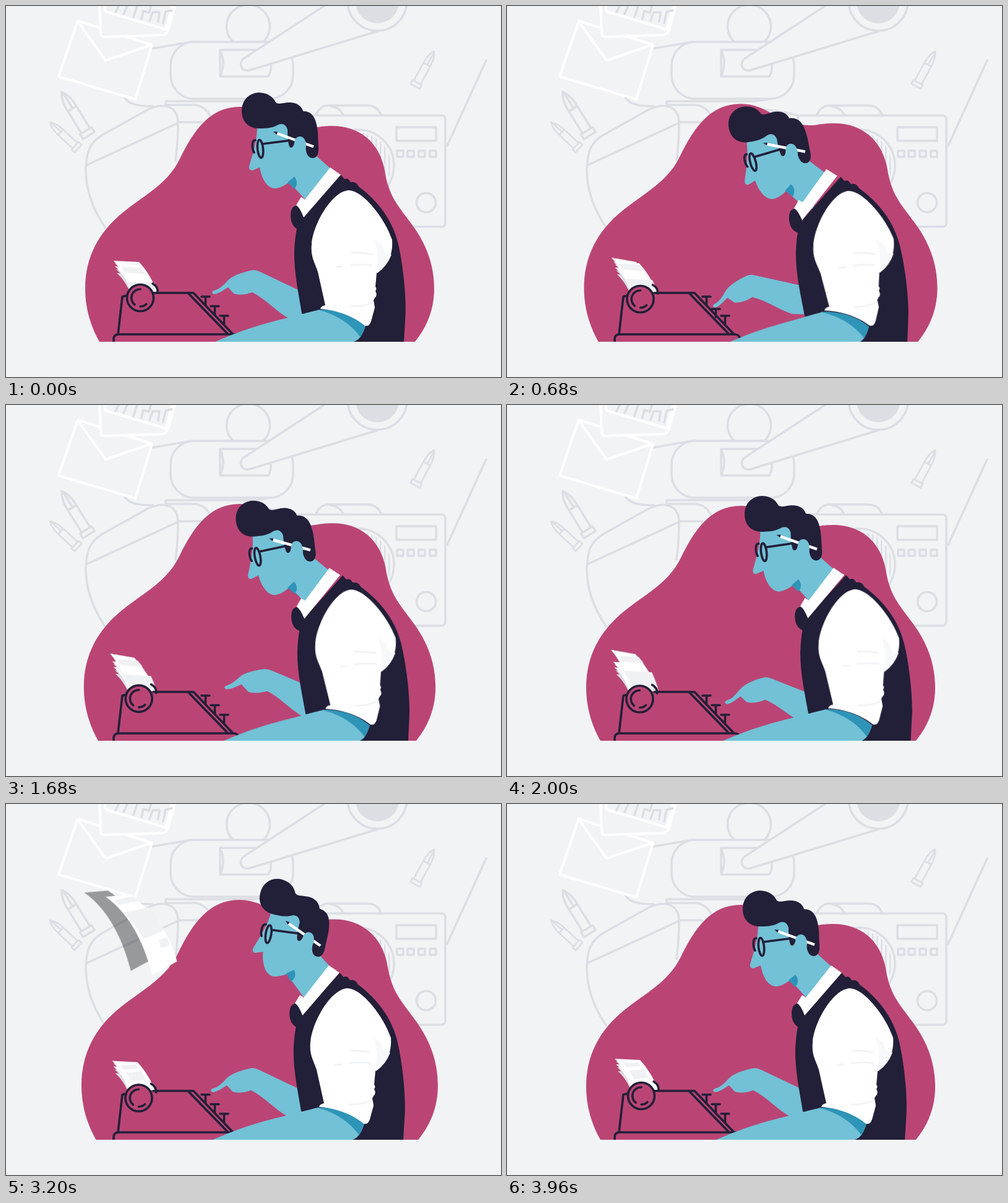
An HTML page that plays this animation: 800x600 px, repeating every 4 s.

```html
<!DOCTYPE html>
<html lang="en">
<head>
<meta charset="utf-8">
<style>
html, body { margin: 0; width: 100%; height: 100%; overflow: hidden; background: #f1f3f5; }
svg { display: block; width: 100%; height: 100%; }
.line { fill: none; stroke: #dcdee4; stroke-width: 3.5; stroke-linecap: round; stroke-linejoin: round; }
.bg { fill: #f1f3f5; }
.mail { fill: #f1f3f5; stroke: #fff; stroke-width: 4; stroke-linejoin: round; }
.ink { fill: none; stroke: #221f38; stroke-width: 3.6; stroke-linecap: round; stroke-linejoin: round; }
.navy { fill: #221f38; }
.skin { fill: #72c1d6; }
.shade { fill: #2e94b8; }
.white { fill: #fff; }
.pink { fill: #ba4574; }
.tint { fill: #eff1f3; }

.move { animation: 4s ease-in-out infinite; }
#blob { transform-origin: 410px 543px; animation: breathe 2s ease-in-out infinite; }
#head { transform-origin: 498px 228px; animation-name: head; }
#neck { transform-origin: 505px 285px; animation-name: neck; }
#vest { transform-origin: 478px 497px; animation-name: vest; }
#collar { transform-origin: 478px 497px; animation-name: collar; }
#sleeve { transform-origin: 555px 299px; animation-name: sleeve; }
#forearm { transform-origin: 475px 480px; animation-name: forearm; }
#leg { transform-origin: 581px 517px; animation-name: leg; }
#carriage, #stack { animation-name: carriage; }
#sheet { transform-origin: 168px 291px; animation-name: sheet; }
#shadow { animation-name: shadow; }
#key { animation-name: key; }

@keyframes breathe {
  0%, 100% { scale: 1; }
  62% { scale: 1.0213; }
}
@keyframes head {
  0%, 99%, 100% { translate: 0 0; rotate: 0deg; }
  17% { translate: -15px 8px; rotate: -8.9deg; }
  33% { translate: -16px 9px; rotate: -9.6deg; }
  50% { translate: 4px 5.5px; rotate: -1deg; }
  64% { translate: 13px 2px; rotate: 13.3deg; }
  70% { translate: 12px 1px; rotate: 16.3deg; }
  80% { translate: 11px 2px; rotate: 15deg; }
}
@keyframes neck {
  0%, 99%, 100% { translate: 0 0; rotate: 0deg; }
  17%, 33% { translate: -9px 8px; rotate: -5deg; }
  50% { translate: 4px 3px; rotate: 0deg; }
  64% { translate: 1px 0; rotate: 5deg; }
  80% { translate: -1px 0; rotate: 6deg; }
}
@keyframes vest {
  0%, 99%, 100% { translate: 0 0; rotate: 0deg; }
  17%, 33% { translate: 3px 4.5px; rotate: -1.2deg; }
  50% { translate: 9px 2.5px; rotate: -.5deg; }
  64% { translate: 3px 0; rotate: -.3deg; }
  80% { translate: -1px 0; rotate: -.1deg; }
}
@keyframes collar {
  0%, 99%, 100% { translate: 0 0; rotate: 0deg; }
  17%, 33% { translate: 3px 4.5px; rotate: -2.6deg; }
  50% { translate: 8px 3px; rotate: -1deg; }
  64% { translate: 3px 0; rotate: -.6deg; }
  80% { translate: -1px 0; rotate: -.3deg; }
}
@keyframes sleeve {
  0%, 99%, 100% { translate: 0 0; rotate: 0deg; }
  17%, 33% { translate: -2px 1px; rotate: -2.1deg; }
  50% { translate: 8.5px 0; rotate: -.8deg; }
  64% { translate: 3px 0; rotate: -.4deg; }
  80% { translate: -2px 0; rotate: 0deg; }
}
@keyframes forearm {
  0%, 99%, 100% { translate: 0 0; rotate: 0deg; }
  17% { translate: 0 -10px; rotate: -13deg; }
  33% {
    translate: 0 0; rotate: 0deg;
    d: path("M356 428Q356 425 362 424C372 421 380 416 386 413C396 411 410 411 420 411.5Q428 412 434 415L474 433L500 450L495 502L480 491C458 474 444 456 430 447C418 448 404 448 398 444L385 429C378 430 368 432 361 431Q356 430 356 428Z");
  }
  50% { translate: 20px 8px; rotate: -4deg; }
  64% { translate: 7px 5.5px; rotate: -1deg; }
  80% { translate: -2px 0; rotate: 0deg; }
  0%, 17%, 50%, 100% {
    d: path("M333 463Q334 460 340 459C350 455 356 445 363 440C374 433 388 429 400 427Q405 427 411 430L476 461L500 470L495 515L455 504C437 494 420 474 398 463C388 467 376 468 368 465L359 455C352 459 343 466 336 466Q333 465 333 463Z");
  }
}
@keyframes leg {
  0%, 99%, 100% { translate: 0 0; rotate: 0deg; }
  17% { translate: 4px 1.5px; rotate: -1.6deg; }
  33% { translate: 4px 1.5px; rotate: -1deg; }
  50% { translate: 9px 1px; rotate: 0deg; }
  64% { translate: 2px 0; rotate: .4deg; }
  80% { translate: -2px 0; rotate: .2deg; }
}
@keyframes carriage {
  0%, 99%, 100% { translate: 0 0; }
  17% { translate: -1.5px 2px; }
  33% { translate: -2px 2px; }
  50%, 80% { translate: -2.5px 3.5px; }
}
@keyframes sheet {
  0% { translate: 6px 121px; rotate: 7deg; opacity: 1; }
  17% { translate: 1px 116px; rotate: 7deg; }
  33% { translate: 0 114px; rotate: 7deg; animation-timing-function: ease-in; }
  50% { translate: 0 105px; rotate: 7deg; animation-timing-function: cubic-bezier(.4, .1, .75, .75); }
  64% { translate: 0 0; rotate: 0deg; scale: 1; animation-timing-function: linear; }
  72% { translate: -22px -85px; rotate: -5deg; animation-timing-function: ease-out; }
  80% { translate: -7px -141px; rotate: -8deg; scale: .95; opacity: 1; }
  84% { translate: -5px -155px; rotate: -8deg; opacity: 0; }
  99.9%, 100% { translate: 6px 121px; rotate: 7deg; scale: 1; opacity: 0; }
}
@keyframes shadow {
  0%, 51%, 100% { translate: 21px 4px; }
  64% { translate: 0 0; }
  72% { translate: -7px -3px; }
  80%, 90% { translate: -14px -8px; }
}
@keyframes key {
  0%, 14%, 20%, 100% { translate: 0 0; }
  17% { translate: 0 4.5px; }
}
</style>
</head>
<body>
<svg viewBox="0 0 800 600">
  <defs>
    <clipPath id="floor"><path d="M0 0H800V543H0Z"/></clipPath>
    <clipPath id="slot"><path d="M0 0H800V463H0Z"/></clipPath>
    <clipPath id="grille"><circle cx="569" cy="258" r="53"/></clipPath>
    <path id="bullet" d="M0 0C-7 10-8 20-8 32V74H8V32C8 20 7 10 0 0ZM-8 32H8M-11 74H11V83H-11ZM1 4V30"/>
    <path id="leaf" d="M174 412L215 414C228 428 238 445 244 463H203C196 440 186 422 174 412Z"/>
    <path id="page" d="M168 291L208 293C246 325 268 370 273 417L228 434C222 380 205 325 168 291Z"/>
    <path id="tee" d="M0 0H13M6.500 0V13"/>
  </defs>

  <g class="line">
    <circle cx="391.500" cy="33" r="35"/>
    <path d="M235 69L300 58"/>
    <rect class="bg" x="266" y="58" width="198" height="92" rx="38"/>
    <path d="M405 71H346V114H424Q429 106 428 94M347 74Q355 92 347 112"/>
    <path class="bg" d="M517-2L384 85C375 93 380 106 393 104L600 41"/>
    <circle class="bg" cx="600" cy="-8" r="48"/>
    <circle cx="600" cy="-7" r="35" style="fill:#dcdee4;stroke:none"/>
    <path d="M192 149C200 160 215 162 237 162M258 160V154L400 154L428 150M258 160H305Q322 162 330 178M278 188H316M400 167Q440 168 470 177"/>
    <path d="M160 358C138 325 129 295 129 265C130 235 135 222 155 209L230 167C258 155 278 163 278 190Q278 220 274 250M131 257L276 190"/>
    <rect x="470" y="177" width="240" height="180" rx="6"/>
    <path d="M500 177Q508 161 520 161H584Q600 161 606 176M525 162Q539 164 545 176"/>
    <rect x="631" y="196" width="64" height="22"/>
    <path d="M632 234h10v10h-10zM649 234h10v10h-10zM667 234h10v10h-10zM685 234h10v10h-10z"/>
    <circle cx="679" cy="318" r="15.500"/>
    <circle cx="569" cy="258" r="58"/>
    <path d="M713 226L776 88"/>
    <path d="M562 258H624" clip-path="url(#grille)" style="stroke-width:110;stroke-dasharray:2.500 4.500;stroke-linecap:butt"/>
    <use href="#bullet" transform="translate(90 139) rotate(-31.800)"/>
    <use href="#bullet" transform="translate(71 188) rotate(-47) scale(.75)"/>
    <use href="#bullet" transform="translate(692 73) rotate(28.500) scale(.78)"/>
  </g>

  <g class="mail">
    <path d="M116 24L236 63L209 151L85 114Z"/>
    <path d="M116 25L161 88L235 63" fill="none"/>
    <path d="M151-5L153 44Q153 50 159 50L252 47Q259 46 262 39L274-5Z"/>
    <path d="M160-5V5Q160 9 165 10L258 38L270-5" fill="none"/>
  </g>
  <path class="line" d="M177 10L183-2M190 13L197-2M206 18L212 0M219 21L222 8L231 11L235-2M232 24L237 10H248L246 25M254 28L258 9L268 7"/>

  <g clip-path="url(#floor)">
    <path id="blob" class="pink" d="M151 543C136 517 128 487 128 457C128 406 150 365 190 333C225 305 262 287 281 247C304 200 330 163 378 163C406 163 424 177 444 187C460 195 480 198 496 197C508 195 514 194 528 194C575 194 605 225 612 266C619 310 635 324 655 352C680 385 692 420 692 457C692 490 681 518 661 543Z"/>

    <g clip-path="url(#slot)">
      <g id="stack" class="move white">
        <use href="#leaf" x="5" y="20" fill="#dfe1e5"/>
        <use href="#leaf" x="4" y="14" fill="#cfd1d6"/>
        <use href="#leaf" x="2" y="9"/>
        <use href="#leaf" x="2" y="4" fill="#dddfe3"/>
        <use href="#leaf"/>
        <path class="tint" d="M188 419L212 418L216 424L193 426ZM197 431L221 429L229 443L205 445Z"/>
      </g>
      <g id="sheet" class="move">
        <g id="shadow" class="move"><use href="#page" x="-21" y="-4" opacity=".37"/></g>
        <use href="#page" class="white"/>
        <path class="tint" d="M181 299L214 297L223 306L188 308ZM193 322L238 319Q251 339 257 362L222 371Q210 342 193 322ZM247 377L262 374L264 388L249 391Z"/>
      </g>
    </g>

    <g class="ink">
      <path d="M174 546V539Q174 531 182 531H368Q376 531 377 540M181 531L188 470L196 468M238 464H303L367 531M295 465L359 531"/>
      <use href="#tee" x="316" y="470"/>
      <g id="key" class="move"><use href="#tee" x="331" y="485.500"/></g>
      <use href="#tee" x="346" y="501"/>
      <g id="carriage" class="move">
        <path d="M237 449Q246 454 245 463"/>
        <circle class="pink" cx="217" cy="472" r="21.500"/>
        <path d="M217 458A14 14 0 0 0 208 483M217 486Q223 486 227 482"/>
      </g>
    </g>

    <path id="forearm" class="move skin"/>

    <path id="neck" class="move skin" d="M452 278L488 318L500 320L528 266L501 242L480 230Z"/>

    <g id="head" class="move">
      <path class="skin" d="M406 192C406 215 402 230 393 259Q392 266 398 266L410 261C413 280 423 296 436 295C450 293 459 283 468 277L497 245L498 195L450 180Z"/>
      <path class="shade" d="M455 285L466 276Q474 286 466 296Z"/>
      <path class="navy" d="M381 170C381 150 395 140 410 140C425 141 432 148 436 156C441 160 448 156 458 156C470 156 478 162 480 170C495 170 500 182 502 192C505 205 504 215 505 228C506 240 502 246 495 246C487 245 485 237 484 228L466 222C464 231 458 231 457 224C455 216 455 208 455 200C452 190 445 189 438 193C428 198 418 198 407 198C390 197 381 185 381 170Z"/>
      <path d="M438 206L497 227.500" fill="none" stroke="#fff" stroke-width="4.500"/>
      <path class="navy" d="M432 203L439 203.500L437.500 208Z"/>
      <path class="skin" d="M466 222C466 215 470 211 475 211C481 211 485 217 485 226L483 242L464 236Z"/>
      <g class="ink">
        <ellipse cx="411" cy="231" rx="4.500" ry="14.500" transform="rotate(-6 411 231)"/>
        <path d="M403 217C397 216 397 230 401 237M415 223L458 217.500"/>
      </g>
    </g>

    <path id="vest" class="move navy" d="M541 273L547 280Q553 277 557 285Q566 283 570 292C602 316 625 347 634 385C643 425 648 480 645 510L642 560H555L478 497C473 465 465 430 466 395Q467 375 470 360L479 340Z"/>
    <g id="collar" class="move">
      <path class="white" d="M524 261L541 273L481 342L473 327L469 322L477 309L483 313Z"/>
      <path class="navy" d="M460 340Q460 323 470 323Q475 326 481 342L479 363Q461 361 460 340Z"/>
    </g>

    <g id="leg" class="move">
      <path class="skin" d="M310 556C350 537 385 522 440 508C465 502 490 495 507 491C540 492 565 503 581 517C577 530 572 540 562 543L552 562H310Z"/>
      <path class="shade" d="M503 491C540 490 565 503 581 517L573 536C557 513 532 498 503 491Z"/>
    </g>

    <g id="sleeve" class="move">
      <path class="white" d="M494 385C496 355 525 301 553 298C578 298 613 345 624 378C626 405 615 420 599 432L597 454Q600 457 597 461Q601 468 596 472L594 476Q596 486 596 488L590 510Q587 519 580 517C560 500 530 491 508 490Q509 485 516 484L504 430C498 412 492 405 494 385Z"/>
      <path fill="#f6f8f9" d="M596 377L607 385L613 400L623 402Q616 421 600 432L601 400Z"/>
      <path d="M557 399Q575 398 592 402M533 422L545 421M556 419Q575 417 592 419M556 486Q580 486 594 479" fill="none" stroke="#f1f3f5" stroke-width="3"/>
    </g>
  </g>
</svg>
</body>
</html>
```
